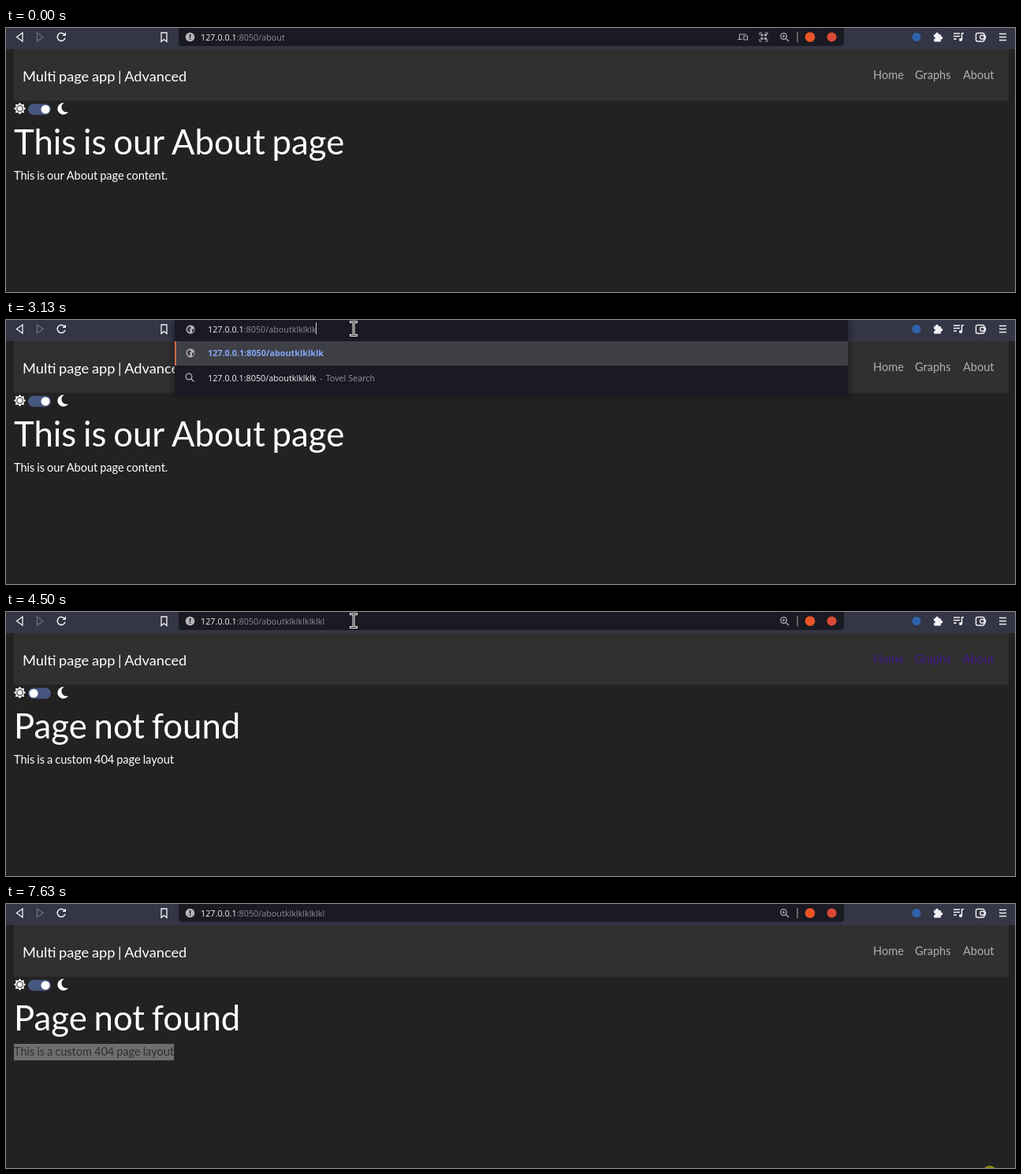
Animation of 1280 by 336 pixels, one loop 7.7 s. Source, as an HTML page with a canvas:

```html
<!DOCTYPE html>
<html lang="en">
<head>
<meta charset="utf-8">
<title>Custom 404 page</title>
<style>
  html, body { margin: 0; width: 100%; height: 100%; overflow: hidden; background: #222; }
  canvas { display: block; }
</style>
</head>
<body>
<canvas id="stage" width="1280" height="336"></canvas>
<script>
const LOOP = 7700;
const ctx = document.getElementById('stage').getContext('2d', { alpha: false });
const LATO = 'Lato, sans-serif', UI = '"Open Sans", sans-serif', SERIF = '"Liberation Serif", serif';
const REM = 14.57, UI_SIZE = 10.8;
const HOST = '127.0.0.1', PATH = ':8050/about';
const KEY_TIMES = [2330, 2530, 2740, 2800, 2940, 3000, 3130, 3260, 3330, 3460, 3460, 3590];
const LINKS = [['Home', 1100], ['Graphs', 1153], ['About', 1214]];
// Pointer stops: time, x, y
const POINTER = [
  [70, 1105, 330], [740, 441, 11], [4600, 441, 11], [5110, 241, 267], [5400, 214, 182],
  [5470, 214, 182], [5930, 46, 182], [6200, 12, 182], [6800, 12, 182], [7430, 1187, 338], [7600, 1248, 343]
];

function rect(x, y, w, h, color, radius = 0) {
  ctx.fillStyle = color;
  ctx.beginPath();
  ctx.roundRect(x, y, w, h, radius);
  ctx.fill();
}
function dot(x, y, r, color) {
  ctx.fillStyle = color;
  ctx.beginPath();
  ctx.arc(x, y, r, 0, 7);
  ctx.fill();
}
function ring(x, y, r, color, width) {
  ctx.strokeStyle = color;
  ctx.lineWidth = width;
  ctx.beginPath();
  ctx.arc(x, y, r, 0, 7);
  ctx.stroke();
}
function line(d, color, width = 1.3) {
  ctx.strokeStyle = color;
  ctx.lineWidth = width;
  ctx.stroke(new Path2D(d));
}
function shape(d, x, y, color) {
  ctx.save();
  ctx.translate(x, y);
  ctx.fillStyle = color;
  ctx.fill(new Path2D(d));
  ctx.restore();
}
// Lato is set with slightly tighter word gaps
function setFont(size, family, weight = 400) {
  ctx.font = `${weight} ${size}px ${family}`;
  ctx.wordSpacing = family === LATO ? `${-0.055 * size}px` : '0px';
}
// Draws text and returns the x of its end
function text(str, x, y, size, color, family, weight) {
  setFont(size, family, weight);
  ctx.fillStyle = color;
  ctx.fillText(str, x, y);
  return x + ctx.measureText(str).width;
}

function sun(x, y, color, back) {
  ctx.fillStyle = color;
  ctx.beginPath();
  for (let i = 0; i < 16; i++) {
    const r = i % 2 ? 5.3 : 7.7, a = i * Math.PI / 8;
    ctx.lineTo(x + r * Math.cos(a), y + r * Math.sin(a));
  }
  ctx.fill();
  ring(x, y, 3.7, back, 1.1);
}
const moon = (x, y, color) =>
  shape('M1.5-7.3A7.4 7.4 0 1 0 7 4A6.3 6.3 0 0 1 1.5-7.3Z', x, y, color);
function globe(x, y) {
  dot(x, y, 5.5, '#b4b5ba');
  shape('M-4-2L-1-4L1-2L-1 0L0 2L-2 4L-4 1ZM2 0L5-1L4 3L2 4Z', x, y, '#3a3b44');
}
function lens(x, y, color) {
  ring(x - 1, y - 1, 3.8, color, 1.3);
  line(`M${x + 2} ${y + 2}l3.5 3.5`, color);
}

function toolbar(t) {
  const white = '#f1f1f4', gray = '#a9aab1';
  rect(0, 0, 1280, 27, '#343545');
  line('M21 6V17L13.5 11.5Z', white);
  line('M39.5 6V17L47 11.5Z', '#6d6e79');
  line('M74.3 8.5A5 5 0 1 0 75 12.8', white, 1.5);
  shape('M0 0V4.6H-4.6Z', 76, 5.5, white);
  line('M197 6H204V17.3L200.5 14.5L197 17.3Z', white);

  rect(219, -6, 844, 29, '#1a1a23', 4);
  if (t < 4360) {
    line('M930.5 14V8H939M928 14.5H934M936 10H940.5V15H936Z', gray, 1.2);
    line('M956 9V6H959M963 6H966V9M966 14V17H963M959 17H956V14', gray, 1);
    for (const [x, y] of [[957.5, 7.5], [962, 7.5], [957.5, 12], [962, 12]]) rect(x, y, 3, 3, gray);
  }
  lens(987.5, 11.5, gray);
  line('M984.7 10.5H988.3M986.5 8.7V12.3', gray, 1);
  line('M1004 5V18', gray, 1);
  dot(1020, 11.5, 6.3, '#ea5528');
  dot(1047.5, 11.5, 6, '#d84a35');
  dot(1155, 11.5, 5.5, '#2f64ad');

  rect(1177, 8, 9, 9.5, white, 1);
  dot(1181, 7.7, 2, white);
  dot(1186.3, 12.5, 2, white);
  dot(1177.3, 12.8, 1.5, '#343545');
  line('M1202 7H1210M1202 10.5H1210M1202 14H1206M1212.5 15V6.8H1215', white, 1.5);
  dot(1211, 15, 2, white);
  ctx.strokeStyle = white;
  ctx.lineWidth = 1.4;
  ctx.beginPath();
  ctx.roundRect(1230.5, 6.5, 10.5, 10.5, 2);
  ctx.roundRect(1236, 9.5, 6.5, 4.5, 1);
  ctx.stroke();
  line('M1260 7.5H1269M1260 11.5H1269M1260 15.5H1269', white, 1.5);
}

function addressBar(t) {
  const typed = 'kl'.repeat(6).slice(0, KEY_TIMES.filter(k => t >= k).length);
  const focused = t >= 730 && t < 4360;
  const open = typed && focused;
  if (open) {
    ctx.save();
    ctx.shadowColor = 'rgba(0,0,0,.45)';
    ctx.shadowBlur = 10;
    rect(214, 0, 854, 97, '#191a23');
    ctx.restore();
    rect(214, 27, 854, 31, '#3f4046');
    rect(214, 27, 2, 31, '#cf6a4c');
    globe(234, 12);
    globe(234, 42);
    lens(233, 73, '#b4b5ba');
    const url = HOST + PATH + typed;
    text(url, 256, 46, UI_SIZE, '#86a8f7', UI, 700);
    const end = text(url, 256, 77.5, UI_SIZE, '#f2f2f4', UI);
    text('-', end + 4, 77.5, UI_SIZE, '#93949c', UI);
    text('Tovel Search', end + 12, 77.5, UI_SIZE, '#93949c', UI);
  } else {
    dot(233.5, 11.5, 5.8, '#b4b5ba');
    rect(232.8, 8, 1.5, 4.5, '#1a1a23');
    rect(232.8, 13.5, 1.5, 1.5, '#1a1a23');
    if (focused) {
      ctx.strokeStyle = '#a0432f';
      ctx.lineWidth = 1;
      ctx.beginPath();
      ctx.roundRect(218.5, 0.5, 844, 22, 4);
      ctx.stroke();
    }
  }
  const hostEnd = text(HOST, open ? 256 : 247, 15.5, UI_SIZE, '#f2f2f4', UI);
  const end = text(PATH + typed, hostEnd, 15.5, UI_SIZE, '#8b8c94', UI);
  const caretOn = focused && t < 4090 && !(t >= 1270 && t < 1800);
  if (caretOn) rect(Math.floor(end), 3, 1, 15, '#c8c8cc');
}

function unstyledPage() {
  const purple = '#4a2480';
  rect(0, 27, 1280, 309, '#fff');
  text('Multi page app | Advanced', 6, 48, REM, purple, SERIF);
  rect(6.5, 63, 14, 5, '#777', 2);
  rect(7.5, 64, 12, 3, '#efefef', 1);
  const end = text('HomeGraphsAbout', 6, 82.5, REM, purple, SERIF);
  line(`M6 84.5H${end}`, purple, 1);
  sun(14, 94, '#0b0b12', '#fff');
  rect(10, 107, 10.5, 10.5, '#3b74d8', 2);
  line('M12 112.3L14.3 114.6L18.5 109.6', '#fff', 1.5);
  moon(14, 130, '#0b0b12');
}

function styledPage(t, pointerX) {
  const missing = t >= 4500;
  // Theme transition right after the page load
  const k = missing ? Math.min(1, (t - 4500) / 150) : 1;
  const mix = (a, b) => a + (b - a) * k;
  rect(0, 27, 1280, 309, '#222');
  rect(10, 27, 1262, 65.5, '#303030');
  text('Multi page app | Advanced', 21, 68, REM * 1.25, '#fff', LATO);
  const linkColor = `rgb(${mix(67, 176)},${mix(24, 176)},${mix(142, 176)})`;
  for (const [label, x] of LINKS) text(label, x, 64.5, REM, linkColor, LATO);
  sun(17.5, 102.5, '#fff', '#222');
  rect(28, 96.5, 29, 14, '#46567f', 7);
  dot(mix(35, 50), 103.5, 5.5, '#fff');
  moon(72, 102.7, '#fff');

  text(missing ? 'Page not found' : 'This is our About page', 10, 161, REM * 3, '#fff', LATO);
  const body = missing ? 'This is a custom 404 page layout' : 'This is our About page content.';
  const blurred = t >= 7630;
  if (t >= 5470) {
    setFont(REM, LATO);
    const width = n => ctx.measureText(body.slice(0, n)).width;
    const edge = t >= 6200 ? 10 : pointerX;
    let n = 0;
    while (n < body.length && 10 + width(n) < edge - 3) n++;
    rect(10 + width(n), 178, width(body.length) - width(n), 21, blurred ? '#6e6e6e' : '#415fcf');
  }
  text(body, 10, 193, REM, blurred ? '#303030' : '#fff', LATO);
}

// The pointer is sampled at 15 steps a second
function pointerAt(t) {
  const step = 1000 / 15;
  t = Math.floor((t + 4) / step) * step;
  let i = 0;
  while (i < POINTER.length - 2 && t > POINTER[i + 1][0]) i++;
  const [t0, x0, y0] = POINTER[i], [t1, x1, y1] = POINTER[i + 1];
  const p = Math.min(1, Math.max(0, (t - t0) / (t1 - t0)));
  const e = p * p * (3 - 2 * p);
  return [x0 + (x1 - x0) * e, y0 + (y1 - y0) * e];
}

function pointer(t, x, y) {
  if (t < 70) return;
  const pressed = (t >= 5440 && t < 6680) || t >= 7630;
  if (pressed) dot(x, y, 10, 'rgba(235,225,0,.52)');
  ctx.save();
  ctx.translate(x, y);
  const overText = y < 24 || (t >= 5400 && y < 199 && x < 215);
  if (overText) {
    const beam = 'M-3.5-8.5H3.5M0-8.5V8.5M-3.5 8.5H3.5';
    ctx.lineCap = 'square';
    line(beam, '#f4f4f4', 3);
    line(beam, '#222', 1);
  } else {
    const arrow = 'M0 0V16L3.7 12.6L6.3 18.5L8.8 17.4L6.2 11.6H11.5Z';
    shape(arrow, 0, 0, '#fff');
    line(arrow, '#000', 1);
  }
  ctx.restore();
}

function draw() {
  const t = performance.now() % LOOP;
  const [x, y] = pointerAt(t);
  if (t >= 4430 && t < 4500) unstyledPage();
  else styledPage(t, x);
  toolbar(t);
  addressBar(t);
  pointer(t, x, y);
  requestAnimationFrame(draw);
}
draw();
</script>
</body>
</html>
```
